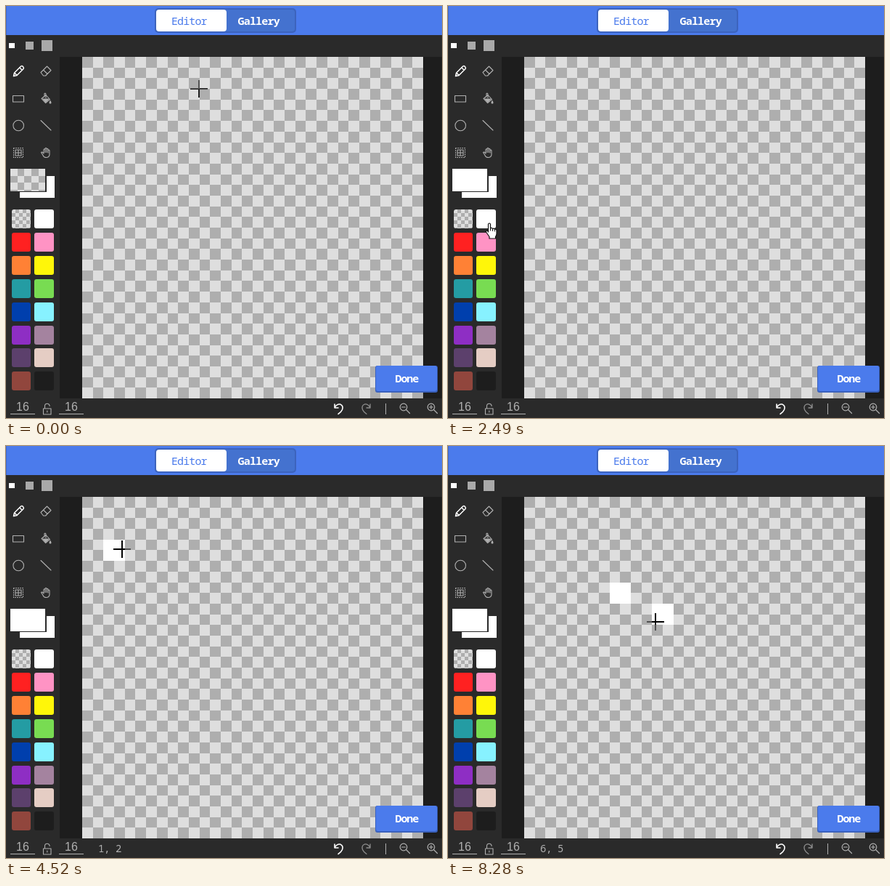
These frames come from a looping animation (601 px wide and 567 px high, 8.43 s). An HTML page with a canvas:

```html
<!DOCTYPE html>
<html lang="en">
<head>
<meta charset="utf-8">
<title>Pixel editor</title>
<style>
html, body { margin: 0; width: 100%; height: 100%; overflow: hidden; background: #2a2a2a; }
canvas { display: block; }
</style>
</head>
<body>
<canvas id="stage" width="601" height="567"></canvas>
<script>
const ctx = document.getElementById('stage').getContext('2d');
const LOOP = 8430, STEPS = 54;
const BLUE = '#4b7bec', PANEL = '#2a2a2a', WELL = '#1d1d1d', GREY = '#b0b0b0';
const LIGHT = '#dedede', DARK = '#aeaeae';
const MONO = '"Noto Sans Mono", "DejaVu Sans Mono", monospace';
const GRID = { x: 105, y: 70, size: 470, cells: 16 };
const CELL = GRID.size / GRID.cells;
const PALETTE = ['', '#fff', '#ff2121', '#ff93c4', '#ff8135', '#fff609', '#249ca3', '#78dc52',
  '#003fad', '#87f2ff', '#8e2ec4', '#a4839f', '#5c406c', '#e5cdc4', '#91463d', WELL];

// Pointer keys: step, x, y
const PATH = [
  [0, 266, 114], [1, 266, 114], [8, 64, 288], [10, 59, 290], [13, 59, 290],
  [16, 57, 299], [17, 57, 299], [19, 51, 195], [20, -60, 195], [21, -60, 195],
  [22, 13, 85], [23, 11, 83], [25, 11, 83], [31, 235, 172], [33, 232, 185],
  [35, 237, 197], [51, 237, 197], [53, 286, 242]
];
const PICK = 12, TOOL_CLICK = 25, PAINT = 41, PAINT_END = 47;

function rect(x, y, w, h, color) {
  ctx.fillStyle = color;
  ctx.fillRect(x, y, w, h);
}

function round(x, y, w, h, r, color) {
  ctx.fillStyle = color;
  ctx.beginPath();
  ctx.roundRect(x, y, w, h, r);
  ctx.fill();
}

function disc(x, y, r, color) {
  ctx.fillStyle = color;
  ctx.beginPath();
  ctx.arc(x, y, r, 0, 7);
  ctx.fill();
}

function stroke(d, color = GREY, width = 1.1, x = 0, y = 0) {
  ctx.save();
  ctx.translate(x, y);
  ctx.strokeStyle = color;
  ctx.lineWidth = width;
  ctx.lineJoin = ctx.lineCap = 'round';
  ctx.stroke(new Path2D(d));
  ctx.restore();
}

function text(str, x, y, font, color, align = 'center', spacing = 0) {
  ctx.font = font;
  ctx.fillStyle = color;
  ctx.textAlign = align;
  ctx.letterSpacing = spacing + 'px';
  ctx.fillText(str, x, y);
  ctx.letterSpacing = '0px';
}

function checker(x, y, w, h, size, flip = 0) {
  rect(x, y, w, h, LIGHT);
  ctx.save();
  ctx.beginPath();
  ctx.rect(x, y, w, h);
  ctx.clip();
  for (let j = 0; j * size < h; j++) {
    for (let i = 0; i * size < w; i++) {
      if ((i + j + flip) % 2) continue;
      const x0 = Math.round(i * size), y0 = Math.round(j * size);
      rect(x + x0, y + y0, Math.round((i + 1) * size) - x0, Math.round((j + 1) * size) - y0, DARK);
    }
  }
  ctx.restore();
}

function header() {
  rect(0, 0, 601, 40, BLUE);
  rect(0, 0, 1, 40, '#3d66c8');
  round(205, 3, 195, 34, 5, '#3c63bd');
  round(207, 5, 191, 30, 4, '#4472cf');
  round(207, 5, 97, 30, 4, '#fff');
  text('Editor', 228, 26, '15px ' + MONO, BLUE, 'left', -0.9);
  text('Gallery', 319.5, 26, 'bold 15px ' + MONO, '#fff', 'left', -0.8);
}

function tools() {
  rect(4, 51, 8, 7, '#fff');
  rect(27, 49, 11, 11, '#a9a9a9');
  rect(49, 47, 15, 15, '#a9a9a9');

  stroke('M10.5 96.5l1-4.5 9-9q1.5-1 3 .5t.5 3l-9 9zM11.7 92l3.4 3.4M18.7 84.8l3.5 3.5', '#fff', 1.5);
  stroke('M48 91.5l8.5-8.5 5.5 5.5-7.5 7.5h-3zM51.5 88l5.6 5.5');
  stroke('M9.5 123.5h15v8.5h-15z');
  stroke('M49 127.5l6-5 5.5 6-6 5zM53 125v-4.5q1.5-1 2 1v5');
  ctx.fillStyle = GREY;
  ctx.fill(new Path2D('M49.5 127.5h10.5l-5.5 5.5zM61 129.5q3 5 0 5t0-5'));
  stroke('M24.5 164.5a7.3 7.3 0 1 0-14.6 0a7.3 7.3 0 1 0 14.6 0');
  stroke('M48 157.5l14 13.5');
  ctx.setLineDash([1, 2]);
  stroke('M10.5 195.5h13v13h-13z');
  ctx.setLineDash([]);
  stroke('M13 198h8v8h-8zM17 198v8M13 202h8');
  stroke('M52 203v-5.5q1-1.5 2 0v-1.5q1-1.5 2 0v1q1-1.5 2 0v1.5q1.5-1 2 .5v5q0 4-4 4.5-4 0-5-3l-2.5-4q1-1.5 3.5 1.5M54 197v4.5M56 197v4.5M58 198v4');
}

function swatches(white) {
  rect(19, 234, 48, 30, '#fff');
  rect(5, 223, 51, 33, PANEL);
  if (white) rect(6, 224, 48, 31, '#fff');
  else checker(6, 224, 48, 31, 9.7, 1);
  PALETTE.forEach((color, i) => {
    const x = i % 2 ? 39 : 8, y = 280 + Math.round((i >> 1) * 31.9), w = i % 2 ? 27 : 26;
    if (color) return round(x, y, w, 26, 3, color);
    ctx.save();
    ctx.beginPath();
    ctx.roundRect(x, y, w, 26, 3);
    ctx.clip();
    checker(x, y, w, 26, 5, 1);
    ctx.restore();
  });
}

function magnifier(x, sign) {
  stroke('M4.8 0a4.8 4.8 0 1 0-9.6 0a4.8 4.8 0 1 0 9.6 0M3.5 3.5l5 5M-2.5 0h5' + sign, GREY, 1.2, x, 552);
}

function footer() {
  for (const x of [23, 90]) {
    text('16', x, 557, '16px "Liberation Sans", Arial, sans-serif', GREY);
    rect(x - 17, 561, 34, 1, GREY);
  }
  stroke('M51.5 554h10.5v8h-10.5zM53.5 554v-3.500a3.300 3.300 0 0 1 6.600 0M56.800 557v2');
  const turn = 'M-5 -6v5h5M-5 -1.500q3-5 7.500-4.500q5 2 3 7.500q-1.500 3.500-5.500 6';
  stroke(turn, '#fff', 1.6, 458, 554);
  ctx.save();
  ctx.translate(497, 554);
  ctx.scale(-1, 1);
  stroke(turn, '#8f8f8f', 1.3);
  ctx.restore();
  rect(523, 547, 1, 15, GREY);
  magnifier(548, '');
  magnifier(586, 'M0-2.500v5');
}

function doneButton() {
  round(509, 495, 86, 37, 3, '#3a61bd');
  round(510, 495, 84, 35, 3, BLUE);
  text('Done', 536.5, 518, 'bold 15px ' + MONO, '#fff', 'left', -1.1);
}

function pointerAt(step) {
  let i = 0;
  while (i < PATH.length - 2 && PATH[i + 1][0] <= step) i++;
  const [s0, x0, y0] = PATH[i], [s1, x1, y1] = PATH[i + 1];
  const k = Math.min(1, (step - s0) / (s1 - s0));
  return { x: Math.round(x0 + (x1 - x0) * k), y: Math.round(y0 + (y1 - y0) * k) };
}

function paintCell(col, row) {
  const x0 = Math.round(GRID.x + col * CELL), y0 = Math.round(GRID.y + row * CELL);
  rect(x0, y0, Math.round(GRID.x + (col + 1) * CELL) - x0,
    Math.round(GRID.y + (row + 1) * CELL) - y0, '#fff');
}

// Inverts whatever lies beneath it
function crosshair(x, y) {
  ctx.save();
  ctx.globalCompositeOperation = 'difference';
  ctx.fillStyle = '#fff';
  ctx.beginPath();
  ctx.rect(x - 1, y - 12, 2, 24);
  ctx.rect(x - 12, y - 1, 24, 2);
  ctx.fill();
  ctx.restore();
}

function hand(x, y) {
  const shape = new Path2D('M-1.500 1q1.500-2 3 0v6q1.500-1.500 3 .5 1.500-1 2.800.7 2-.5 2.700 1.300v5q0 2-1.500 4v2.500h-8.500v-2.500l-4.500-6.500q-.5-2.500 2-1.500l1 1.500z');
  ctx.save();
  ctx.translate(x, y);
  ctx.lineWidth = 1.2;
  ctx.lineJoin = 'round';
  ctx.strokeStyle = '#111';
  ctx.fillStyle = '#fff';
  ctx.fill(shape);
  ctx.stroke(shape);
  ctx.restore();
  stroke('M1.500 7v3M4.500 8v2.500M7.300 9v2', '#111', 1, x, y);
}

function draw(step) {
  const { x, y } = pointerAt(step);
  const white = step >= PICK;
  const col = Math.floor((x - GRID.x) / CELL), row = Math.floor((y - GRID.y) / CELL);
  const inside = col >= 0 && row >= 0 && col < GRID.cells && row < GRID.cells;

  rect(0, 0, 601, 567, PANEL);
  rect(74, 70, 527, 470, WELL);
  header();
  tools();
  swatches(white);
  checker(GRID.x, GRID.y, GRID.size, GRID.size, CELL / 2);
  if (step >= PAINT) paintCell(4, 4);
  if (inside && white) paintCell(col, row);
  footer();
  if (inside && step > 1) text(`${col}, ${row}`, 127, 559, '14px ' + MONO, GREY, 'left', -0.4);
  doneButton();

  if (x >= 74) crosshair(x, y);
  else hand(x, y);
  if (step === TOOL_CLICK || (step >= PAINT && step < PAINT_END)) {
    disc(x, y, 15, 'rgba(255,255,0,.5)');
  }
}

let last = -1;
function tick(now) {
  const t = now % LOOP;
  const step = Math.min(STEPS - 1, Math.floor((t + 18) / (LOOP / STEPS)));
  if (step !== last) draw(last = step);
  requestAnimationFrame(tick);
}
draw(0);
requestAnimationFrame(tick);
</script>
</body>
</html>
```
